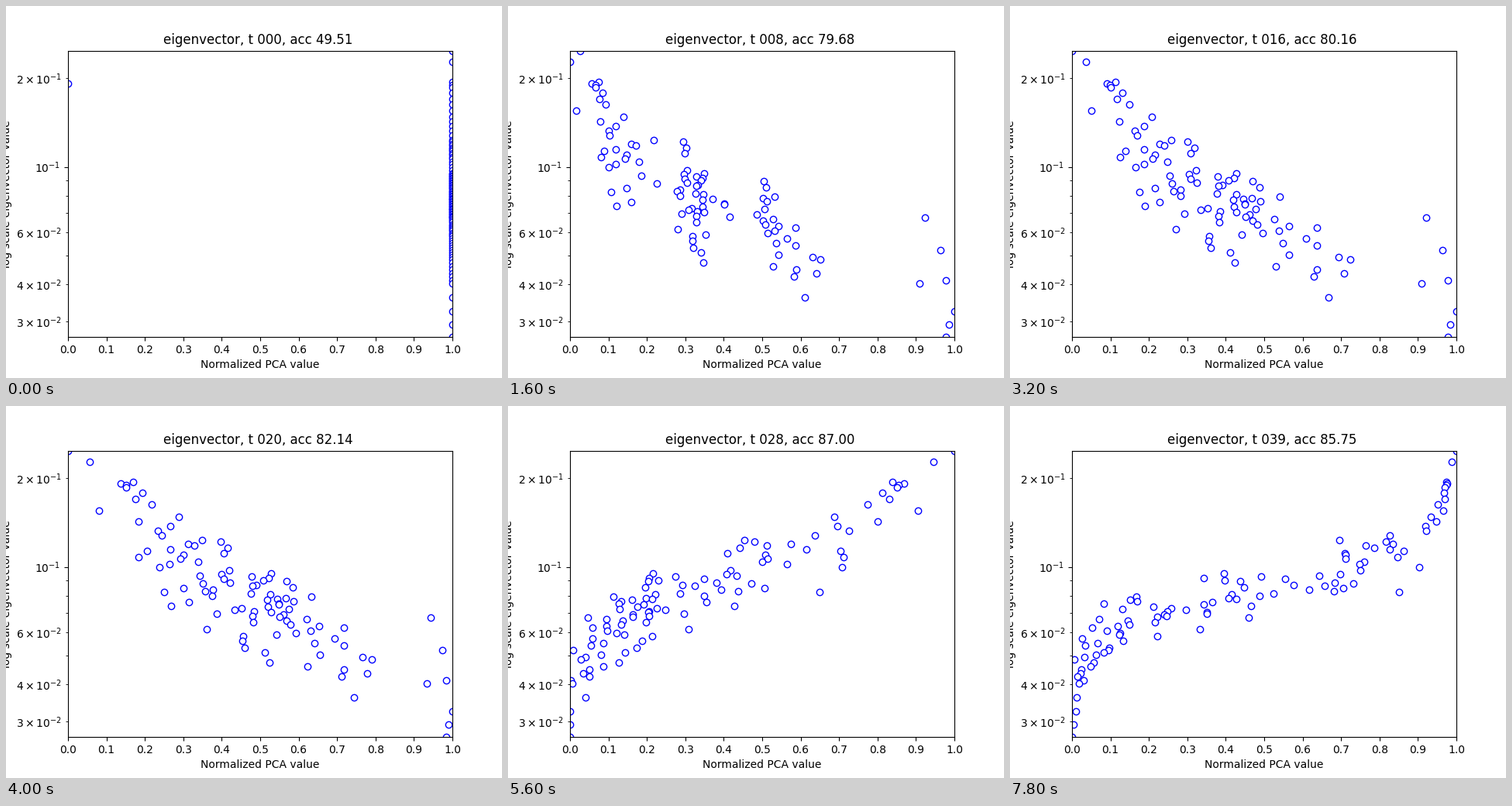
A matplotlib script that plays this animation: 640x480 px, repeating every 8 s.

```python
import numpy as np
import matplotlib.pyplot as plt
from matplotlib.animation import FuncAnimation

FRAMES, STEP_MS = 40, 200
POINTS = 102
TOP, BOTTOM = 0.2478, 0.02652
FLIP = 22  # the PCA sign turns here


def curve(x, *knots):
    return np.interp(x, *zip(*knots))


# fixed height of each point: depth below TOP on the log axis, 0 to 1
depth = curve(np.arange(POINTS),
              (0, 0), (1, .038), (2, .108), (5, .127), (10, .23), (15, .312),
              (25, .377), (30, .428), (50, .51), (70, .588), (80, .648),
              (90, .729), (97, .813), (99, .911), (101, 1))
values = TOP * (BOTTOM / TOP) ** depth


def scatter_states():
    """Component of each point before and after the sign turns."""
    rng = np.random.default_rng(11)
    width = np.sin(np.pi * depth) ** 1.5
    shift = .12 * width * rng.normal(size=POINTS).clip(-1.8, 1.8)
    extra = .07 * width * rng.normal(size=POINTS)

    early = shift + curve(depth, (0, 0), (.13, .17), (.25, .19), (.33, .34),
                          (.45, .44), (.6, .5), (.72, .64), (.86, .73),
                          (.91, 1), (1, .98))
    early[[69, 86, 96, 97]] = .94, .97, .98, .93  # strays on the right

    trend = curve(depth, (0, 1), (.25, .92), (.33, .66), (.42, .48), (.5, .4),
                  (.55, .24), (.62, .19), (.67, .08), (.8, .02), (1, 0))
    late = trend - 4 * trend * (1 - trend) * (1.2 * shift + extra)
    return early.clip(0, 1), late.clip(0, 1)


def build_keys():
    """Positions at the key times, all in the falling orientation."""
    early, late = scatter_states()
    start = np.ones(POINTS)
    start[3] = 0
    clusters = curve(early, (0, .03), (.05, 0), (.15, .07), (.25, .11),
                     (.345, .19), (.355, .28), (.54, .355), (.56, .5),
                     (.68, .555), (.82, .68), (.93, .905), (1, 1))
    spread = early * (.6 + .4 * early)
    middle = ((1 - early + late) / 2) ** 1.6
    gain = np.minimum(1.3, np.minimum(2.6 * (1 - late), 5 * late))
    final = late + gain * (late - middle)
    return [start, clusters, spread, early, 1 - middle, 1 - late, 1 - final]


times = [0, 8, 16, 20, 28, 34, 39]
accuracy = [49.51, 79.68, 80.16, 82.14, 87.00, 88.19, 85.75]
keys = build_keys()


def state(t):
    i = min(np.searchsorted(times, t, side="right") - 1, len(times) - 2)
    u = (t - times[i]) / (times[i + 1] - times[i])
    if i == 0:
        u = 1 - (1 - u) ** 3  # fast start
    x = (1 - u) * keys[i] + u * keys[i + 1]
    x = (x - x.min()) / (x.max() - x.min())
    acc = (1 - u) * accuracy[i] + u * accuracy[i + 1]
    return (1 - x if t >= FLIP else x), acc


fig, ax = plt.subplots(figsize=(6.4, 4.8), dpi=100)
dots, = ax.plot(keys[0], values, "o", mfc="white", mec="blue")
ax.set_yscale("log")
ax.set_xticks(np.arange(11) / 10)
ax.set_xlim(0, 1)
ax.set_ylim(BOTTOM, TOP)
ax.set_xlabel("Normalized PCA value")
ax.set_ylabel("log scale eigenvector value")
title = ax.set_title("", x=.495)


def draw(t):
    x, acc = state(t)
    dots.set_xdata(x)
    title.set_text(f"eigenvector, t {t:03d}, acc {acc:.2f}")
    return dots, title


anim = FuncAnimation(fig, draw, frames=FRAMES, interval=STEP_MS,
                     init_func=lambda: draw(0), repeat=True, repeat_delay=0)
plt.show()
```
